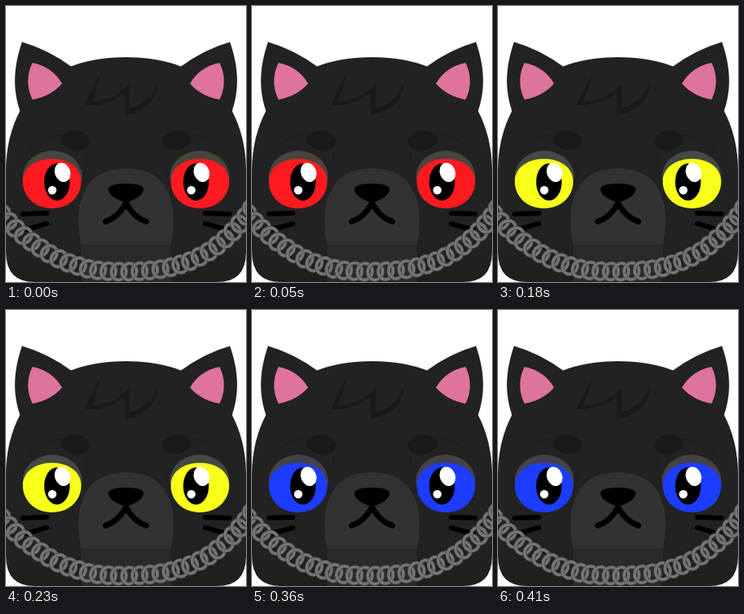
An HTML page without scripts for the animation above (450 ms loop, 300x345 px).

```html
<!DOCTYPE html>
<html lang="en">
<head>
<meta charset="utf-8">
<title>Cat with colour-changing eyes</title>
<style>
  html, body { margin: 0; width: 100%; height: 100%; overflow: hidden; background: #fff; }
  svg { display: block; width: 300px; height: 345px; }
  .iris { animation: iris 450ms -1ms step-end infinite; }
  .lid { animation: lid 450ms -1ms step-end infinite; }
  @keyframes iris {
    0%, 100% { fill: #ff1a20; }
    20% { fill: #5a62e2; }
    40% { fill: #f8ff18; }
    60% { fill: #35ff1c; }
    80% { fill: #1c3cff; }
  }
  @keyframes lid {
    0%, 100% { fill: #48443e; }
    20% { fill: #414141; }
    40% { fill: #434a45; }
    60% { fill: #41494a; }
    80% { fill: #454148; }
  }
</style>
</head>
<body>
<svg viewBox="0 0 300 345">
  <defs>
    <linearGradient id="fur" gradientUnits="userSpaceOnUse" x1="0" y1="295" x2="0" y2="345">
      <stop offset="0" stop-color="#222"/>
      <stop offset="1" stop-color="#201e1d"/>
    </linearGradient>

    <marker id="link" markerUnits="userSpaceOnUse" markerWidth="34" markerHeight="34"
            viewBox="-17 -17 34 34" orient="auto">
      <g fill="none" transform="rotate(12)">
        <ellipse rx="9.3" ry="10.4" stroke="#444" stroke-width="4.8"/>
        <ellipse rx="9.3" ry="10.4" stroke="#757575" stroke-width="3.4"/>
      </g>
    </marker>

    <!-- Left half of the face, mirrored for the right -->
    <g id="side">
      <path fill="#222" d="M20 45Q52 54 82 76L60 125L18 133C9 107 8 80 20 45Z"/>
      <path fill="#de739b" d="M33 71Q58 76 70 97Q56 113 33 117Q22 94 33 71Z"/>
      <path fill="none" stroke="#1e1e1e" d="M29 184C32 158 101 150 102 186Q103 200 97 212"/>
      <ellipse cx="87" cy="168" rx="18" ry="12" fill="#191919" transform="rotate(8 87 168)"/>
      <path fill="none" stroke="#000" stroke-width="6" stroke-linecap="round"
            d="M21 260L51 259M23 280L51 272"/>
    </g>

    <g id="pupil">
      <ellipse cx="63.700" cy="220" rx="16" ry="23.300"/>
      <g fill="#fff">
        <ellipse cx="70.700" cy="208" rx="9.700" ry="12.200" transform="rotate(-20 70.700 208)"/>
        <circle cx="57.800" cy="230.300" r="5.300"/>
      </g>
    </g>
  </defs>

  <path fill="url(#fur)" d="M150 64Q190 64 220 76Q268 94 282 130Q300 164 300 205V308Q300 345 264 345H36Q0 345 0 308V205Q0 164 18 130Q32 94 80 76Q110 64 150 64Z"/>
  <use href="#side"/>
  <use href="#side" transform="matrix(-1 0 0 1 300 0)"/>

  <!-- Both eyes share one path, so they always change together -->
  <path class="lid" d="M21 213a37 32 0 0 1 74 0a37 32 0 0 1 -74 0ZM205 213a37 32 0 0 1 74 0a37 32 0 0 1 -74 0Z"/>
  <path class="iris" d="M21 219c0 -16 15 -28 36.500 -28s36.500 12 36.500 28c0 20 -16 34 -36.500 34s-36.500 -14 -36.500 -34Z
                        M206 219c0 -16 15 -28 36.500 -28s36.500 12 36.500 28c0 20 -16 34 -36.500 34s-36.500 -14 -36.500 -34Z"/>
  <use href="#pupil"/>
  <use href="#pupil" x="173.800"/>

  <path fill="#191919" d="M119 83Q107 106 98 124Q126 126 148 109L149 137Q190 128 190 92Q184 120 154 128L155 97Q134 119 108 119Q114 101 119 83Z"/>

  <path fill="#323232" d="M94 299C86 262 88 203 150 203S214 262 206 299Z"/>
  <path fill="#2a2a2a" d="M94 298H206V345H94Z"/>
  <path d="M128 229Q129 222 150 222T172 229Q172 236 160 242Q150 248 140 242Q128 236 128 229Z"/>
  <path fill="none" stroke="#000" stroke-width="7" stroke-linecap="round" stroke-linejoin="round"
        d="M150 242V246Q141 264 124.500 269.500M150 246Q159 264 175.500 269.500"/>

  <polyline fill="none" marker-start="url(#link)" marker-mid="url(#link)" marker-end="url(#link)"
    points="-6,259 3,269 12,278 22,287 32,295 43,302.500 54,309.500 66,316 78,321 90,325 102.500,328.500
            115,330.500 128,331.500 141,332 154,332 167,331.500 180,330.500 193,329 206,326.500 218,323
            230,319 242,313.500 253.500,307 264,299.500 274,291 283.500,282 292,272.500 300,263 307,253"/>
</svg>
</body>
</html>
```
